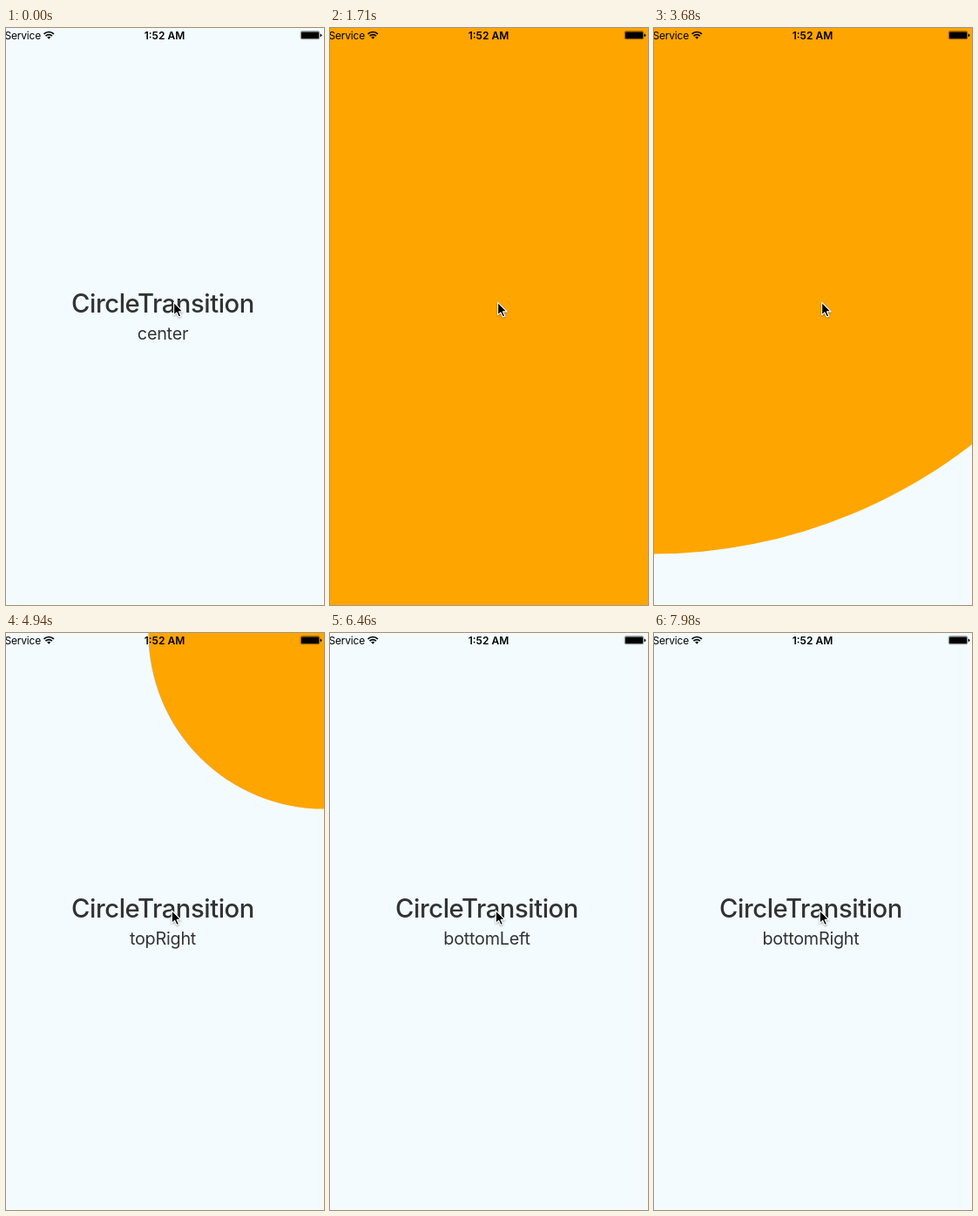
An HTML page for the animation above (8 s loop, 365 by 661 pixels).

```html
<!DOCTYPE html>
<html lang="en">
<head>
<meta charset="utf-8">
<title>Circle transition</title>
<style>
  html, body { margin: 0; width: 100%; height: 100%; overflow: hidden; background: #f3fbff; }
  svg { display: block; width: 100%; height: 100%; font-family: Inter, "Liberation Sans", sans-serif; }
  .title { font-size: 29.2px; font-weight: 500; letter-spacing: -.015em; }
  .label { font-size: 19.8px; letter-spacing: -.012em; }
  .status { font-size: 12px; }
  .clock { font-weight: 600; }
  #cursor { filter: drop-shadow(0 1px 1px #0005); }
</style>
</head>
<body>
<svg viewBox="0 0 365 661">
  <rect width="365" height="661" fill="#f3fbff"/>
  <g fill="#333" text-anchor="middle">
    <text class="title" x="180" y="326">CircleTransition</text>
    <text class="label" id="label" x="180" y="357">center</text>
  </g>
  <circle id="disc" fill="#ffa500"/>

  <g class="status">
    <text x="-1.5" y="12.5" letter-spacing="-.2">Service</text>
    <text class="clock" x="182" y="12.5" text-anchor="middle">1:52 AM</text>
    <path d="M43.5 6.9a8 8 0 0 1 11.4 0M45.5 9.2a5.2 5.2 0 0 1 7.4 0" fill="none" stroke="#000" stroke-width="1.7"/>
    <path d="M49.2 12.8l-2-2.2a2.9 2.9 0 0 1 4 0z"/>
    <rect x="338.3" y="3.8" width="21.4" height="8.9" rx="1.6" fill="none" stroke="#000" stroke-width=".5"/>
    <rect x="339" y="4.5" width="20" height="7.5" rx=".8"/>
    <path d="M360.6 6.4q1.8.4 1.8 1.9t-1.8 1.9z"/>
  </g>

  <path id="cursor" d="M0 0V14.4L3.3 11.4 5.7 16.6 8.2 15.5 5.9 10.5H10.4Z"
        stroke="#fff" stroke-width="1.1" stroke-linejoin="round"/>
</svg>
<script>
const LOOP = 8000;
const byId = id => document.getElementById(id);
const label = byId("label"), disc = byId("disc"), cursor = byId("cursor");

// Times in ms; the radius grows from `start` at `speed` px/ms, sampled every `step` ms.
const scenes = [
  { text: "center", from: 0, first: 1350, start: 1305, close: 2160, step: 90, x: 182.5, y: 330.5, speed: .95 },
  { text: "topLeft", from: 3330, first: 3330, start: 3310, close: 4040, step: 87.5, x: -3, y: 1, speed: 1.626 },
  { text: "topRight", from: 4760, first: 4760, start: 4816, close: 5570, step: 90, x: 365, y: 0, speed: 1.626 },
  { text: "bottomLeft", from: 6460, first: 6460, start: 6505, close: 7350, step: 88.3, x: 0, y: 661, speed: 1.626 },
  { text: "bottomRight", from: 7980, first: LOOP, start: LOOP, close: LOOP, step: 90, x: 365, y: 661, speed: 1.626 }
];

function radiusAt(scene, t) {
  if (t < scene.first || t >= scene.close) return 0;
  const held = scene.first + Math.floor((t - scene.first) / scene.step) * scene.step;
  return Math.max(0, (held - scene.start) * scene.speed);
}

function draw(t) {
  const scene = scenes.findLast(s => t >= s.from);
  label.textContent = scene.text;
  disc.setAttribute("cx", scene.x);
  disc.setAttribute("cy", scene.y);
  disc.setAttribute("r", radiusAt(scene, t));
  cursor.setAttribute("transform", t < 3950 ? "translate(192.6 314.4)" : "translate(190.3 317.9)");
}

const begin = performance.now();
function tick() {
  draw((performance.now() - begin) % LOOP);
  requestAnimationFrame(tick);
}
tick();
</script>
</body>
</html>
```
